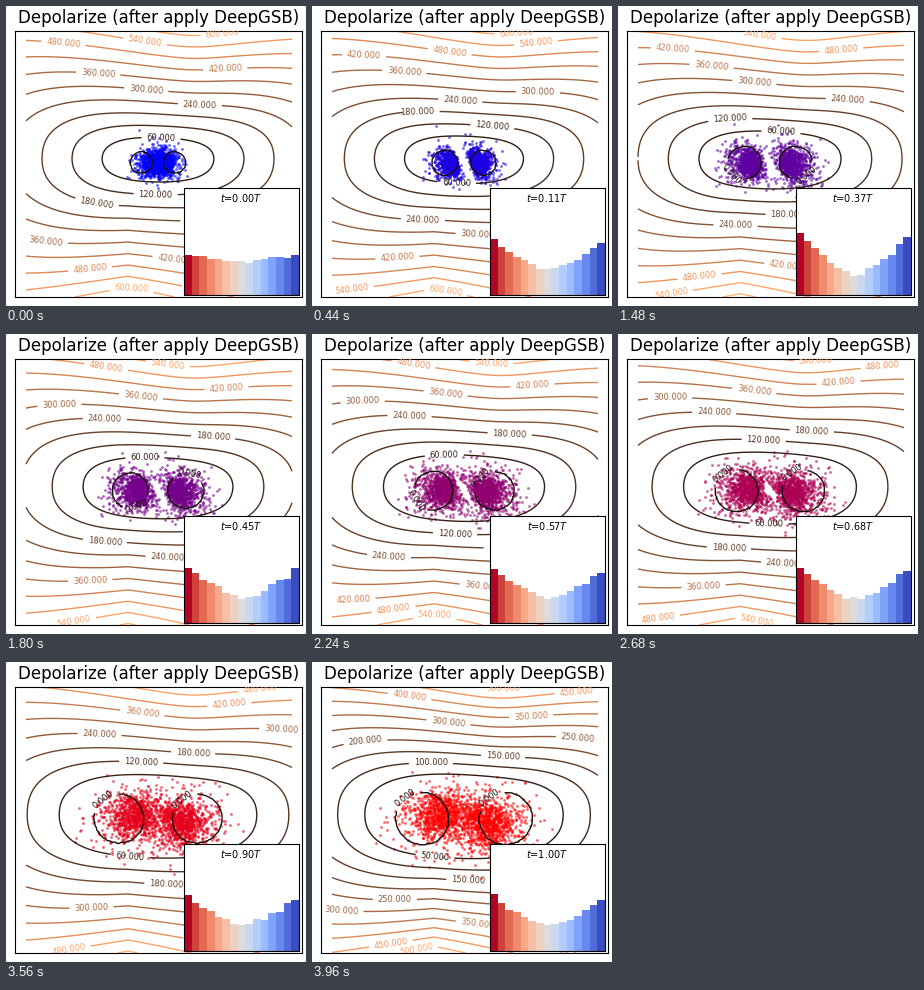
These frames come from a looping animation (300x300 px, 4000 ms). A matplotlib script:

```python
import numpy as np
import matplotlib.pyplot as plt
from matplotlib.animation import FuncAnimation

SIZE, FRAMES, STEP_MS = 300, 100, 40
BOX = (9, 25, 295.5, 291)
CX, CY = 152.0, 157.0
N, BINS = 2000, 15

rng = np.random.default_rng(4)
za, zb = rng.normal(size=(2, 2, N)) * rng.uniform(0.5, 1.35, N)
side = np.sign(za[0] - 0.3 * za[1])
bar_noise = rng.normal(0, 1.2, (FRAMES, BINS))
gx, gy = np.meshgrid(np.linspace(20, 286, 200), np.linspace(25, 291, 200))


def fall(t):
    return 118 * t ** 1.25


def field(x, y, t):
    """Value surface: a tilted bowl that sinks with t, holding two round wells."""
    dx, v = x - CX, y - CY + 4.3
    tilt_up = 38 - np.hypot(20, 0.9 * (dx - 35))
    tilt_down = 48 - 0.85 * np.abs(dx + 30)
    up = -5.1 * v + 12 - tilt_up * v / 120
    down = 4.6 * v + 12 + tilt_down * (v / 120) ** 2
    vert = np.maximum(np.where(v < 0, up, down), 1)
    horiz = np.hypot(2 * dx, 95 * t) + 8
    bowl = (vert ** 2.6 + horiz ** 2.6) ** (1 / 2.6) - 60 - fall(t)

    from_well = np.hypot(np.abs(dx) - 17 - 25 * t, y - CY)
    well = 2 * (from_well - 11 - 15 * t)
    return np.where(well < 0, np.minimum(bowl, well),
                    np.maximum(bowl, np.minimum(well, 45)))


def cloud(t):
    """One blob splits into two halves, which then widen and mix."""
    gap = 14 * (1 - np.exp(-t / 0.15)) + 9 * t ** 2
    turn = 1.5 * t
    z = za * np.cos(turn) + zb * np.sin(turn)
    x = side * gap + (8.5 + 10 * t) * z[0]
    y = side * gap * 0.18 + (6.5 + 8.5 * t) * z[1]
    # keep a thin slanted slit open at the centre
    push = 4 * np.sin(np.pi * t) * np.exp(-(x * x + y * y) / 200)
    push *= np.sign(0.89 * x - 0.46 * y)
    return CX + x + 0.89 * push, CY + y - 0.46 * push


def bar_heights(n, t):
    u = np.abs(np.arange(BINS) - 7.2) / 7
    bend = 28 * (1 - 0.8 * np.exp(-t / 0.06))
    bend += 25 * np.exp(-((t - 0.28) / 0.12) ** 2)
    return 36 + bend * (u ** 1.5 - 0.4) + bar_noise[n]


def px_axes(x0, y0, x1, y1):
    ax = fig.add_axes([x0 / SIZE, 1 - y1 / SIZE, (x1 - x0) / SIZE, (y1 - y0) / SIZE])
    ax.set(xticks=[], yticks=[])
    return ax


fig = plt.figure(figsize=(3, 3), dpi=100, facecolor="white")
ax = px_axes(*BOX)
inset = px_axes(178, 182, 293, 288.5)
inset.set(xlim=(0, BINS), ylim=(0, 106.5))
bars = inset.bar(np.arange(BINS) + 0.5, np.ones(BINS), width=1,
                 color=plt.cm.coolwarm(np.linspace(1, 0, BINS)))
clock = inset.text(7.5, 97, "", fontsize=7, ha="center", va="center")


def draw(n):
    t = n / (FRAMES - 1)
    step = 60 if t < 0.9 else 50
    top = np.ceil((685 - fall(t)) / step) * step

    ax.clear()
    ax.set_title("Depolarize (after apply DeepGSB)", fontsize=12)
    ax.scatter(*cloud(t), s=4, color=(t, 0, 1 - t), alpha=0.6,
               linewidths=0, zorder=1)
    cs = ax.contour(gx, gy, field(gx, gy, t), levels=np.arange(0, top + 1, step),
                    cmap="copper", vmin=-step, vmax=top, linewidths=1)
    ax.set(xlim=(BOX[0], BOX[2]), ylim=(BOX[3], BOX[1]), xticks=[], yticks=[])
    ax.clabel(cs, fontsize=6, fmt="%1.3f")

    for bar, h in zip(bars, bar_heights(n, t)):
        bar.set_height(h)
    clock.set_text(f"$t$={t:.2f}$T$")
    return []


anim = FuncAnimation(fig, draw, frames=FRAMES, interval=STEP_MS,
                     init_func=lambda: draw(0), repeat=True, repeat_delay=0)
plt.show()
```
